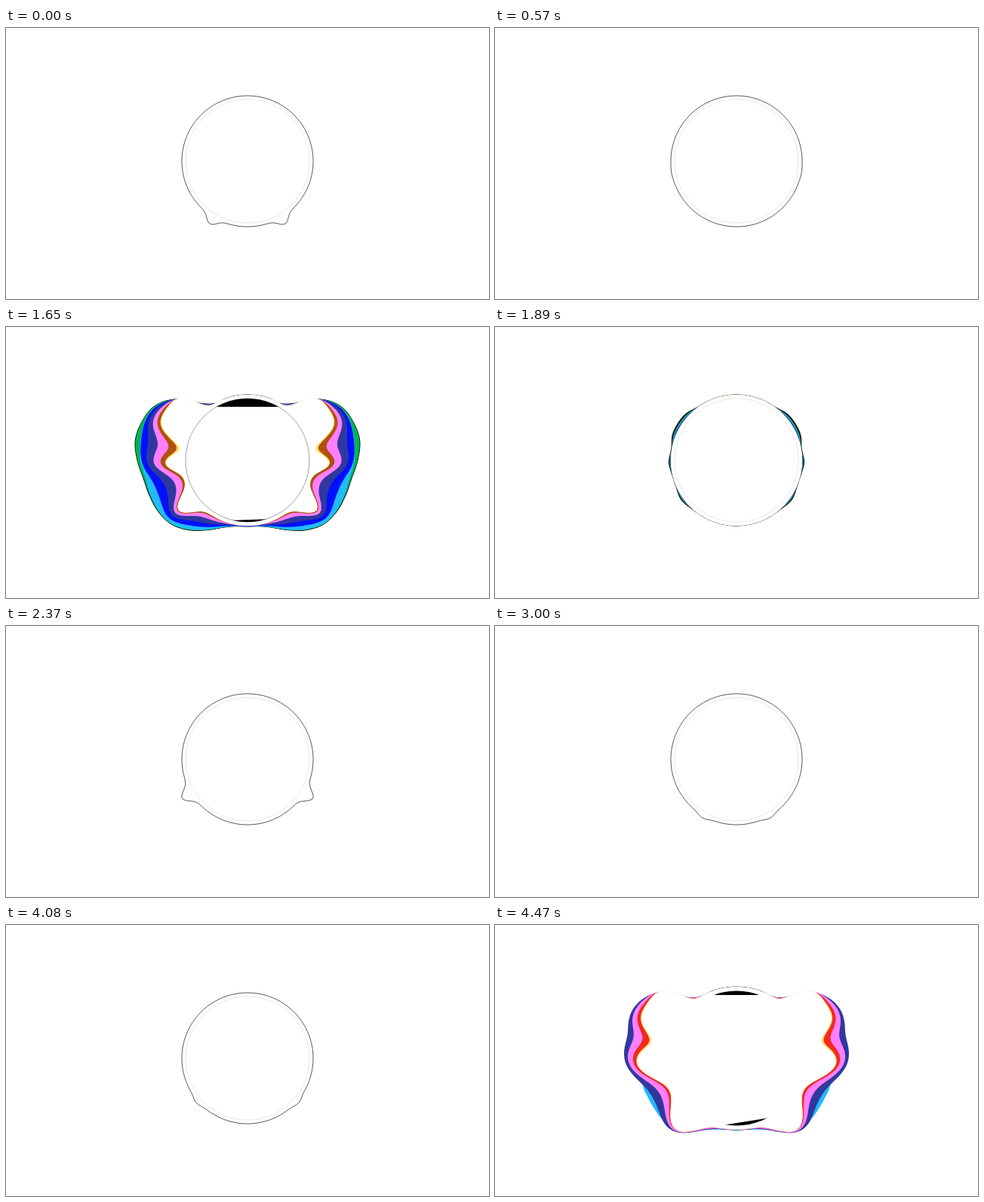
Animation, 640 px wide and 360 px high, one loop 4.5 s. Source, as an HTML page with a canvas:

```html
<!DOCTYPE html>
<html lang="en">
<head>
<meta charset="utf-8">
<title>Spectrum ring</title>
<style>
  html, body { margin: 0; width: 100%; height: 100%; overflow: hidden; background: #fff; }
  canvas { display: block; width: 640px; height: 360px; }
</style>
</head>
<body>
<canvas id="stage" width="640" height="360"></canvas>
<script>
const ctx = document.getElementById('stage').getContext('2d');
const LOOP = 4500, STEP = 30;
const CX = 320, CY = 177, RING = 87, DISC = 82;
const LAG = 12, RISE = 120, FALL = 96, FADE = 220, LEAD = 54;

// Height of a full hit above the ring, every 10 degrees from top to bottom.
const HIT = [0, 0, 0, 0, 12, 39, 56, 62, 64, 59, 53, 51, 49.5, 45, 34, 20, 8, 2, 1];

// Each layer trails the one before it; white leads.
const COLORS = ['#fff', '#ffdd66', null, '#ff7fff', '#3038a0', '#0010ff', '#22bbff', '#00b450', '#000'];
const CYAN = 6;

// mid, low: lobes [angle, height, width]; top, base: edges of the cover [distance, tilt].
const BEATS = [
  { at: 1554, peak: 1500, from: 0, red: '#b05010', mid: [92, 21, 8], low: [126, 26, 9], top: [71, 0], base: [79, -2] },
  { at: 3354, peak: 3300, from: 0, red: '#f02a1e', mid: [92, 21, 8], low: [127, 8, 10], top: [71, -3], base: [78.4, 0] },
  { at: 4424, peak: 4440, from: 50, red: '#f02a1e', mid: [92, 34, 14], low: [139, 27, 14], top: [84, 0], base: [85, -9] }
];

// Quiet notes: [time, angle, height]
const NOTES = [
  [0, 149, 10], [180, 150, 15], [390, 101, 8], [690, 150, 15], [900, 125, 7], [1140, 101, 7],
  [2370, 121, 14], [2610, 150, 15], [2880, 150, 12], [3090, 140, 7], [4080, 131, 3]
];

const clamp = v => Math.max(0, Math.min(1, v));
const smooth = v => { v = clamp(v); return v * v * (3 - 2 * v); };
const bell = (a, [mid, height, width], power = 2) =>
  height * Math.exp(-(Math.abs((a - mid) / width) ** power));

function hitHeight(a) {
  const i = Math.min(17, Math.floor(a / 10)), f = a / 10 - i;
  const [p, q, r, s] = [-1, 0, 1, 2].map(k => HIT[Math.max(0, Math.min(18, i + k))]);
  return q + f * (r - p + f * (2 * p - 5 * q + 4 * r - s + f * (3 * (q - r) + s - p))) / 2;
}

function noteHeight(a, t) {
  return NOTES.reduce((sum, [at, mid, height]) => {
    const d = t - at;
    const level = d < 0 ? clamp(1 + d / 90) : clamp(1 - d / 240) ** 2;
    return level ? sum + bell(a, [mid, height * level, 6.2]) : sum;
  }, 0);
}

// Returns the bump height by angle for one layer of a beat.
function beatShape(beat, t, layer) {
  const d = t - beat.at - layer * LAG;
  const age = beat.from + Math.max(0, d);
  const level = clamp(1 + Math.min(0, d) / RISE) * clamp(1 - Math.max(0, age - FALL) / FADE) ** 2;
  const u = (1 - clamp(age / FALL) ** 3) ** 3;
  return a => {
    const down = smooth((a - 85) / 25);
    const mix = u ** (layer === CYAN ? 2.6 - 2 * down : 0.85 + 0.75 * down);
    const rest = bell(a, [58, 40, 17], 4) + bell(a, beat.mid) + bell(a, beat.low);
    return level * (rest + (hitHeight(a) - rest) * mix);
  };
}

function outline(height, scale) {
  ctx.beginPath();
  for (let a = 0; a < 360; a += 2) {
    const r = scale * (RING + height(a > 180 ? 360 - a : a));
    const rad = a * Math.PI / 180;
    ctx.lineTo(CX - r * Math.sin(rad), CY - r * Math.cos(rad));
  }
  ctx.closePath();
}

function stroke(color, width) {
  ctx.strokeStyle = color;
  ctx.lineWidth = width;
  ctx.stroke();
}

function coverEdge([distance, tilt], direction) {
  ctx.save();
  ctx.translate(CX, CY);
  ctx.rotate(tilt * Math.PI / 180);
  ctx.fillStyle = '#000';
  ctx.fillRect(-120, direction > 0 ? distance : -distance - 60, 240, 60);
  ctx.restore();
}

function drawDisc(scale, beat, t) {
  ctx.save();
  ctx.beginPath();
  ctx.arc(CX, CY, DISC * scale, 0, 2 * Math.PI);
  const lit = beat && t >= beat.peak && t < beat.peak + 240;
  if (scale === 1) stroke(lit ? '#666' : '#d8d8d2', 0.6);
  if (lit) {
    ctx.clip();
    coverEdge(beat.top, -1);
    coverEdge(beat.base, 1);
  }
  ctx.restore();
}

function draw(t) {
  ctx.fillStyle = '#fff';
  ctx.fillRect(0, 0, 640, 360);
  const beat = BEATS.find(b => t >= b.at - LEAD && t < b.at + 480);
  const scale = beat && t >= beat.peak ? 1 + 0.12 * clamp(1 - ((t - beat.peak) / 60) ** 2) : 1;

  if (beat) {
    for (let i = COLORS.length - 1; i >= 0; i--) {
      outline(beatShape(beat, t, i), scale);
      if (i === COLORS.length - 1) stroke('#000', 1);
      ctx.fillStyle = COLORS[i] || beat.red;
      ctx.fill();
    }
  } else {
    outline(a => noteHeight(a, t), 1);
    stroke('#000', 0.65);
  }
  drawDisc(scale, beat, t);
}

function tick(now) {
  const t = Math.floor((now % LOOP) / STEP) * STEP;
  draw(t < 60 ? 0 : t);
  requestAnimationFrame(tick);
}

draw(0);
requestAnimationFrame(tick);
</script>
</body>
</html>
```
